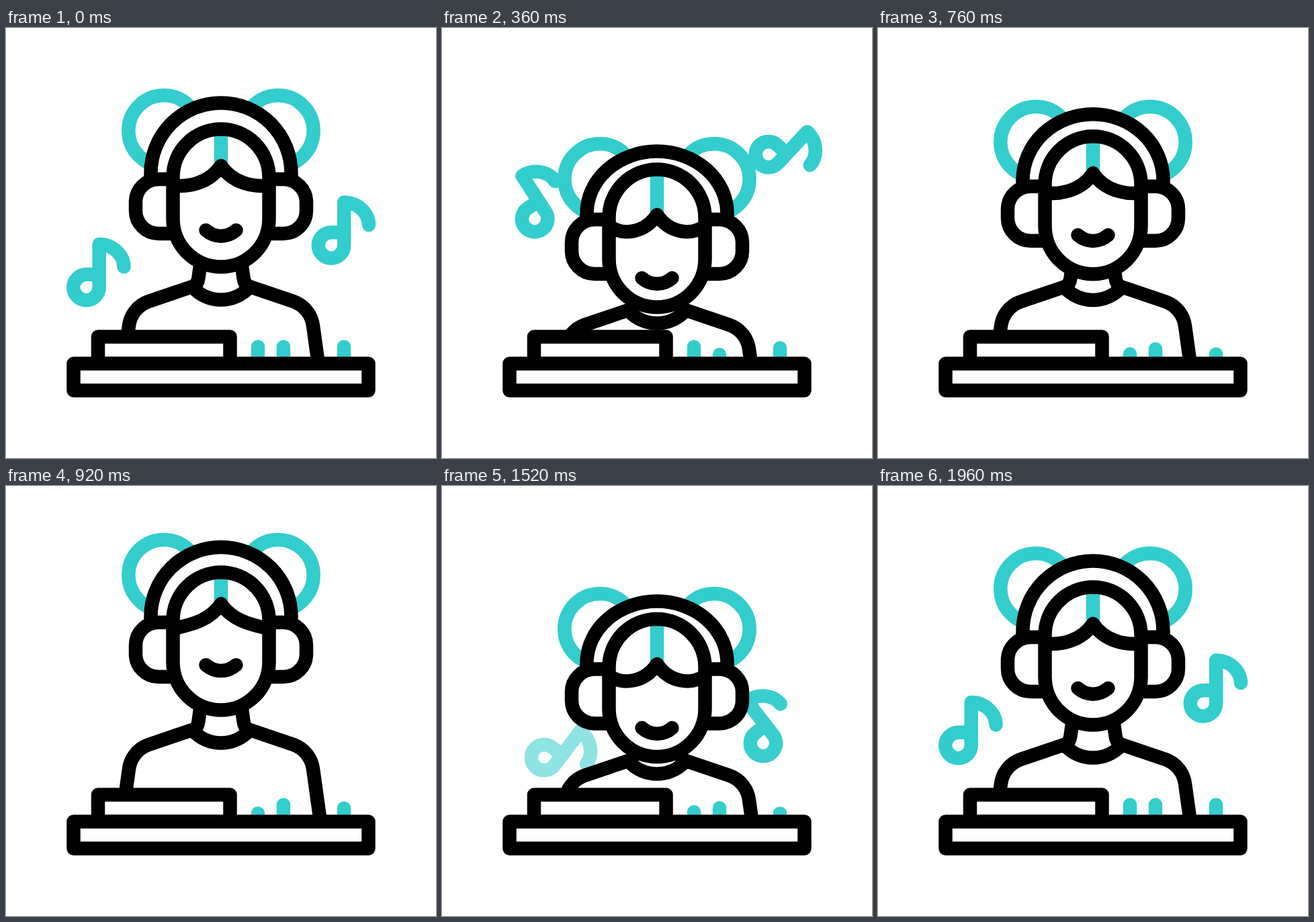
These frames come from a looping animation (640x640 px, 2400 ms). An HTML page:

```html
<!DOCTYPE html>
<html lang="en">
<head>
<meta charset="utf-8">
<title>DJ</title>
<style>
  html, body { margin: 0; width: 100%; height: 100%; overflow: hidden; background: #fff; }
  svg { display: block; width: 100vw; height: 100vh; }
  .ink { fill: none; stroke: #000; stroke-width: 20.5; stroke-linejoin: round; }
  .teal { fill: none; stroke: #33cdcd; stroke-width: 20.5; stroke-linejoin: round; }
  .solid { fill: #fff; }
  .round { stroke-linecap: round; }
</style>
</head>
<body>
<svg viewBox="0 0 640 640">
  <defs>
    <path id="note" d="M1.2 3.3H-18A19.2 19.2 0 1 0 1.2 22.5V-41.5C22 -41.5 38 -25 38 -8"/>
    <path id="ear" d="M248.5 225H227A34 34 0 0 0 193 259V272A34 34 0 0 0 227 306H248.5"/>
    <path id="neck" d="M289.5 350L286.5 372Q285.5 381 279 384"/>
    <clipPath id="above"><path d="M0 0H640V515H0Z"/></clipPath>
  </defs>

  <use id="noteL" href="#note" class="teal round"/>
  <use id="noteR" href="#note" class="teal round"/>

  <g id="buns" class="teal">
    <circle cx="235" cy="153" r="52.7"/>
    <circle cx="405" cy="153" r="52.7"/>
  </g>

  <g clip-path="url(#above)">
    <g id="body" class="ink">
      <path class="solid" d="M172 522L183 443C185 428 195 413 212 407L277 385C300 411 340 411 363 385L428 407C445 413 455 428 457 443L468 522"/>
      <use href="#neck"/>
      <use href="#neck" transform="matrix(-1 0 0 1 640 0)"/>
    </g>
  </g>

  <path id="band" class="ink solid"/>
  <g id="head" class="ink">
    <g class="solid">
      <use href="#ear"/>
      <use href="#ear" transform="matrix(-1 0 0 1 640 0)"/>
    </g>
    <path id="faceFill" fill="#fff" stroke="none" d="M248.5 222A71.5 71.5 0 0 1 391.5 222V284A71.5 71.5 0 0 1 248.5 284Z"/>
  </g>
  <path id="part" class="teal"/>
  <path id="bangs" class="ink"/>
  <path id="smile" class="ink round" d="M297.5 301C311 312.5 329 312.5 342.5 301"/>
  <path id="face" class="ink" d="M248.5 222A71.5 71.5 0 0 1 391.5 222V284A71.5 71.5 0 0 1 248.5 284Z"/>

  <path id="bar0" class="teal round"/>
  <path id="bar1" class="teal round"/>
  <path id="bar2" class="teal round"/>

  <path class="ink solid" d="M137 459.5H333.5V499.5H137Z"/>
  <path class="ink solid" d="M100.5 499.5H539.5V539.5H100.5Z"/>
</svg>
<script>
const LOOP = 2400, END = 1960, STEP = 20;
const $ = id => document.getElementById(id);
const clamp = x => Math.max(0, Math.min(1, x));

// Eased value from [time, value] keys.
function ease(keys, t) {
  let i = 1;
  while (i < keys.length - 1 && t > keys[i][0]) i++;
  const [t0, a] = keys[i - 1], [t1, b] = keys[i];
  const x = clamp((t - t0) / (t1 - t0));
  return a + (b - a) * x * x * (3 - 2 * x);
}

// Two bounces: down, up, down, rest.
const bounce = (down, up, down2) =>
  [[0, 0], [460, down], [980, up], [1430, down2], [END, 0]];
const moves = {
  body: bounce(39.8, -24.3, 26),
  face: bounce(68.3, -25.4, 51.5),
  band: bounce(82, -24.3, 65),
  hair: bounce(83, -34, 65),
  smile: bounce(81, -39, 64)
};

const bars = [
  { x: 375, keys: [[0, 0], [380, 0], [900, 13], [1220, 0], [1600, 12], [END, 0]] },
  { x: 413, keys: [[0, 0], [440, 13], [920, 0], [1260, 12], [1720, 0], [END, 0]] },
  { x: 503, keys: [[0, 0], [280, 0], [640, 13], [1140, 0], [1520, 13], [END, 0]] }
];

// out: [speed, acceleration] for x, y, turn; from: x, y, turn 440 ms before rest.
const notes = [
  { id: "noteL", x: 137.5, y: 363.5, fade: 600, show: 1487, from: [42.5, 33.5, 37],
    out: [[.1418, -.000367], [-.2775, -.0000625], [-.0742, -.0000485]] },
  { id: "noteR", x: 502, y: 301, fade: 548, show: 1462, from: [-23.5, 53, -37.6],
    out: [[-.042, .000213], [-.3675, .000118], [.126, -.0000185]] }
];

const shift = (id, y) => $(id).setAttribute("transform", `translate(0 ${y})`);

function drawNote(n, t) {
  const leaving = t < 1000;
  const [dx, dy, turn] = leaving
    ? n.out.map(([v, a]) => v * t + a * t * t)
    : n.from.map(d => d * (END - t) / 440);
  const el = $(n.id);
  el.setAttribute("transform", `translate(${n.x + dx} ${n.y + dy}) rotate(${turn})`);
  el.setAttribute("opacity", leaving ? clamp(1 - (t - n.fade) / 60) : clamp((t - n.show) / 60));
}

function draw(ms) {
  const t = Math.min(END, Math.floor(ms % LOOP / STEP) * STEP);
  const p = {};
  for (const k in moves) p[k] = ease(moves[k], t);

  shift("body", p.body);
  shift("head", p.face);
  shift("face", p.face);
  shift("buns", p.band);
  shift("smile", p.smile);

  const base = 216 + p.face, rise = base - (111.5 + p.band);
  $("band").setAttribute("d", `M215.5 ${base + 6}V${base}A104.5 ${rise} 0 0 1 424.5 ${base}V${base + 6}`);

  const h = p.hair, side = 234.5 + p.face;
  $("part").setAttribute("d", `M320 ${150 + p.face}V${202 + h}`);
  $("bangs").setAttribute("d",
    `M248.5 ${side}C270 ${237 + h} 302 ${232 + h} 320 ${205 + h}` +
    `C338 ${232 + h} 370 ${237 + h} 391.5 ${side}`);

  bars.forEach((b, i) =>
    $("bar" + i).setAttribute("d", `M${b.x} ${474.5 + ease(b.keys, t)}V495`));
  notes.forEach(n => drawNote(n, t));
}

const start = performance.now();
function tick() {
  draw(performance.now() - start);
  requestAnimationFrame(tick);
}
tick();
</script>
</body>
</html>
```
